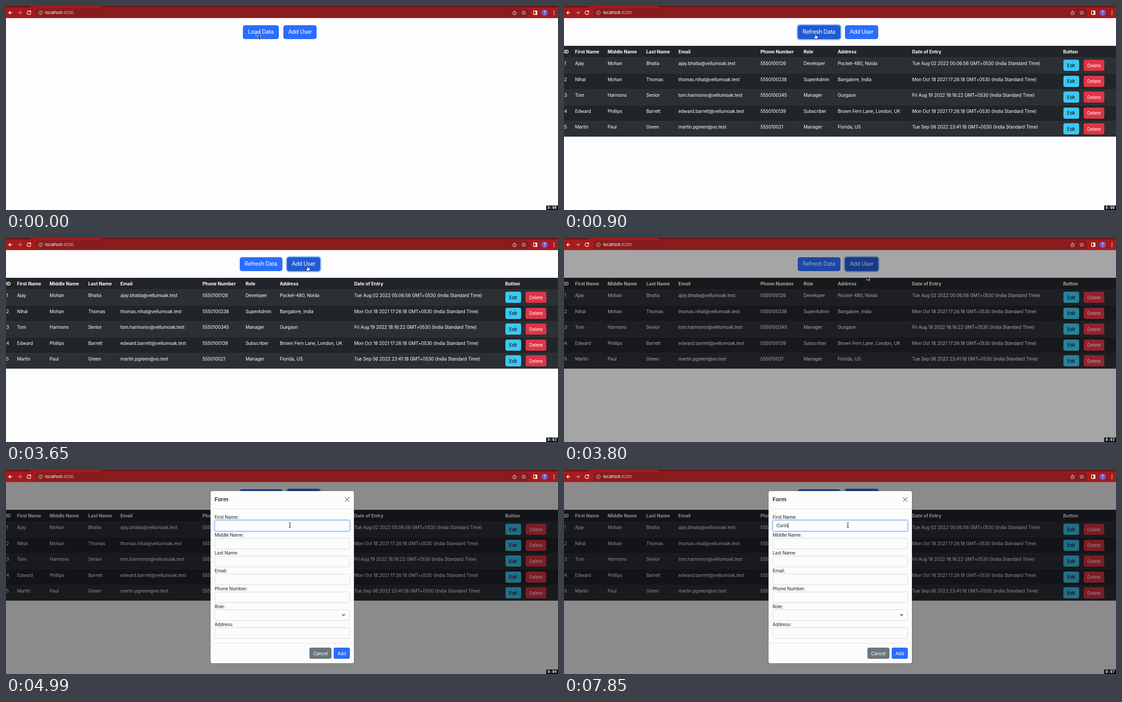
Recreate the animation shown at these times as an HTML page. Size 1228 by 456 pixels, loop 8000 ms.

```html
<!DOCTYPE html>
<html lang="en">
<head>
<meta charset="utf-8">
<title>User table</title>
<style>
html, body { margin: 0; width: 100%; height: 100%; overflow: hidden; }
body { background: #fdfdfd; }
#stage { position: relative; width: 1228px; height: 456px; overflow: hidden; background: #fdfdfd;
  font: 10.2px/20px Inter, "Open Sans", sans-serif; letter-spacing: -.016em; color: #212529; }
#stage div, #stage span, #stage svg { position: absolute; box-sizing: border-box; text-wrap: nowrap; }
#page, #modal, #chrome { left: 0; top: 0; width: 1228px; }
.bar { background: #a51b1c; }
.strip { background: #6f1113; }
.pill { background: #871c1e; border-radius: 10px; }
.url { font-size: 9.3px; color: #fff; }
.url i { font-style: normal; color: #e0b9b9; }
.head { background: #212529; }
.row { background: #212529; border-top: 1px solid #34383b; }
.row.odd { background: #2c3034; }
.cell { color: #fff; }
.th { color: #fff; font-weight: 700; letter-spacing: 0; }
.btn { display: flex; align-items: center; justify-content: center; border-radius: 4px; color: #fff; }
.lg { font-size: 12.6px; letter-spacing: -.03em; border-radius: 5px; background: #2b6dfc; }
.lg.dark { background: #215bd2; }
.lg.ring { box-shadow: 0 0 0 2.5px #9ac0fc; }
.info { background: #3dc8f1; color: #000; }
.danger { background: #dc3547; }
.gray { background: #6c757d; }
.blue { background: #2b6dfc; }
#shade { left: 0; top: 27px; width: 1228px; height: 429px; background: #000; }
.sheet { background: #fcfcfc; border: 1px solid rgba(0,0,0,.2); border-radius: 5px; background-clip: padding-box; }
.rule { background: #dee2e6; }
.title { font-size: 12.4px; font-weight: 600; letter-spacing: 0; }
.input { border: 1px solid #cfd4d9; border-radius: 4px; }
.input.focus { border-color: #86b3fb; box-shadow: 0 0 0 2px #c4d9fc; }
#stage #typed { top: 118.3px !important; height: 12px; border-right: 1px solid transparent; line-height: 12px; }
#stage #typed.on { border-right-color: #111; }
#clock { left: 1202px; top: 446px; width: 26px; height: 10px; background: #000; color: #fff;
  font: bold 8.5px/10px "DejaVu Sans Mono", monospace; letter-spacing: 0; text-align: center; }
</style>
</head>
<body>
<div id="stage">
  <div id="page"></div>
  <div id="shade"></div>
  <div id="modal"></div>
  <div id="chrome"></div>
  <svg width="1228" height="28" style="left:0;top:0" fill="none" stroke="#fff" stroke-width="1.3">
    <path d="M14 15H6.5M10 11.2L6.2 15L10 18.8"/>
    <path d="M26.5 15H34M30.6 11.2L34.4 15L30.6 18.8" stroke="#d68d8d"/>
    <path d="M54.2 12.2A4.2 4.2 0 1 0 55.2 15.6M55 10.4V13.2H52"/>
    <g stroke="#ecd0d0" stroke-width="1">
      <circle cx="76.6" cy="15" r="4.2"/><path d="M76.6 14.4V17.4M76.6 12.4V13.4"/>
      <path d="M1129.6 13.4H1128V19H1134.6V13.4H1133M1131.3 16.5V10.8M1129.4 12.6L1131.3 10.7L1133.2 12.6"/>
      <path d="M1151.8 10.6L1153.1 13.5L1156.2 13.8L1153.9 15.9L1154.6 19L1151.8 17.4L1149 19L1149.7 15.9L1147.4 13.8L1150.5 13.5Z"/>
    </g>
    <path d="M1173.6 11H1181.4V19H1173.6Z"/><path d="M1178 11H1181.4V19H1178Z" fill="#fff" stroke="none"/>
    <circle cx="1198.3" cy="15" r="7.2" fill="#7559c4" stroke="none"/>
    <g fill="#fff" stroke="none"><circle cx="1219" cy="11.2" r="1.1"/><circle cx="1219" cy="15" r="1.1"/><circle cx="1219" cy="18.8" r="1.1"/></g>
  </svg>
  <svg width="1228" height="456" style="left:0;top:0">
    <g id="arrow" stroke="#fff" stroke-width=".8">
      <path d="M0 0V9.6L2.2 7.6L3.6 10.9L5.3 10.2L3.9 7H6.8Z"/>
    </g>
    <g id="hand" fill="#fff" stroke="#000" stroke-width=".8" stroke-linejoin="round">
      <path d="M-1 1Q0 -.5 1 1V4.3L4.6 5.2Q5.5 5.6 5.3 7.3L4.5 11.2H-.8L-3.6 7.5Q-3.9 6 -2.5 6.2L-1 7.5Z"/>
    </g>
    <g id="beam" fill="none" stroke="#222">
      <path d="M-2.5 -5.5Q0 -5.5 0 -4Q0 -5.5 2.5 -5.5M0 -4.5V4.5M-2.5 5.5Q0 5.5 0 4Q0 5.5 2.5 5.5M-1.2 1.5H1.2"/>
    </g>
    <circle id="ripple" cx="561.5" cy="64.5" r="5.5" fill="none" stroke="#a9c6ff" stroke-width=".9"/>
  </svg>
  <div id="clock"></div>
</div>
<script>
const $ = id => document.getElementById(id);
const page = $('page'), modal = $('modal'), chrome = $('chrome');

function add(parent, tag, cls, style, text = '') {
  const e = document.createElement(tag);
  e.className = cls;
  for (const k in style) e.style[k] = style[k] + 'px';
  e.textContent = text;
  return parent.appendChild(e);
}
const box = (p, cls, left, top, width, height, text) => add(p, 'div', cls, { left, top, width, height }, text);
const label = (p, cls, left, mid, text) => add(p, 'span', cls, { left, top: mid - 10 }, text);

// Browser bar
box(chrome, 'bar', 0, 0, 1228, 27);
box(chrome, 'strip', 0, 0, 55, 3);
box(chrome, 'strip', 211, 0, 1017, 3);
box(chrome, 'pill', 65, 5, 1100, 20);
label(chrome, 'url', 87, 15, '').innerHTML = 'localhost<i>:4200</i>';
label($('stage'), 'url', 1195.5, 15, 'T');

// Page
const loadBtn = box(page, 'btn lg', 527, 42.5, 79.5, 31);
const addBtn = box(page, 'btn lg', 617, 42.5, 74, 31, 'Add User');
const table = box(page, '', 0, 0, 1228, 293);
const cols = [0.5, 24.5, 97, 183, 254.5, 437, 533, 609, 774.5, 1110.5];
const heads = ['ID', 'First Name', 'Middle Name', 'Last Name', 'Email', 'Phone Number', 'Role', 'Address', 'Date of Entry', 'Button'];
const zone = ' GMT+0530 (India Standard Time)';
const users = [
  ['Ajay', 'Mohan', 'Bhatia', 'ajay.bhatia@vellumoak.test', '5550100126', 'Developer', 'Pocket-480, Noida', 'Tue Aug 02 2022 05:06:56'],
  ['Nihal', 'Mohan', 'Thomas', 'thomas.nihal@vellumoak.test', '5550100238', 'SuperAdmin', 'Bangalore, India', 'Mon Oct 18 2021 17:26:18'],
  ['Tom', 'Harmons', 'Senior', 'tom.harmonsr@vellumoak.test', '5550100345', 'Manager', 'Gurgaon', 'Fri Aug 19 2022 18:16:22'],
  ['Edward', 'Phillips', 'Barrett', 'edward.barrett@vellumoak.test', '5550100139', 'Subscriber', 'Brown Fern Lane, London, UK', 'Mon Oct 18 2021 17:26:18'],
  ['Martin', 'Paul', 'Green', 'martin.pgreen@vo.test', '555010021', 'Manager', 'Florida, US', 'Tue Sep 06 2022 23:41:18']
];
box(table, 'head', 0, 89, 1228, 26);
heads.forEach((h, i) => label(table, 'th', cols[i], 102, h));
users.forEach((user, r) => {
  const y = 114.8 + r * 35.45;
  box(table, r % 2 ? 'row' : 'row odd', 0, y, 1228, 35.6);
  [r + 1, ...user].forEach((v, c) => label(table, 'cell', cols[c], y + 13.6, c === 8 ? v + zone : v));
  box(table, 'btn info', 1110.5, y + 5.6, 35, 25, 'Edit');
  box(table, 'btn danger', 1156, y + 5.6, 46, 25, 'Delete');
});

// Form
box(modal, 'sheet', 453.5, 45.5, 321.5, 387);
label(modal, 'title', 464, 66, 'Form');
box(modal, 'rule', 454, 86, 320, 1);
box(modal, 'rule', 454, 386.5, 320, 1);
const fields = ['First Name', 'Middle Name', 'Last Name', 'Email', 'Phone Number', 'Role', 'Address'].map((name, i) => {
  label(modal, '', 464, 104.8 + 40 * i, name + ':');
  return box(modal, 'input', 464, 111.8 + 40 * i, 300.5, 25);
});
box(modal, 'btn gray', 675, 397, 49, 25, 'Cancel');
box(modal, 'btn blue', 729, 397, 35.5, 25, 'Add');
modal.insertAdjacentHTML('beforeend',
  `<svg width="775" height="400" style="left:0;top:0" fill="none" stroke-linecap="round" stroke-width="1.3">
    <path d="M754.5 61.5L763.5 70.5M763.5 61.5L754.5 70.5" stroke="#777"/>
    <path d="M748 322.5L751 325.5L754 322.5" stroke="#343a40"/></svg>`);
const typed = label(modal, '', 472.5, 128, '');
typed.id = 'typed';

// Each pose holds until the next entry
const path = [
  [0, 'arrow', 561, 65], [150, 'hand', 560, 62], [300, 'hand', 559.5, 62],
  [1220, 'hand', 566, 66], [1370, 'arrow', 615, 84], [1520, 'arrow', 755, 112],
  [1670, 'arrow', 925, 132], [1820, 'arrow', 1055, 139], [1970, 'hand', 1114, 137],
  [2130, 'hand', 1121, 135], [2280, 'hand', 1140, 135], [2430, 'hand', 1168, 135],
  [2580, 'hand', 1174, 134], [2730, 'arrow', 1149, 134], [2880, 'hand', 1119.5, 133.5],
  [3030, 'arrow', 965, 108], [3200, 'arrow', 699, 57], [3350, 'hand', 672, 58],
  [3650, 'hand', 671, 62], [3800, 'arrow', 674, 85], [3940, 'beam', 634, 121.5],
  [4090, 'beam', 632, 123], [4240, 'beam', 631.5, 123.5]
];
const typing = [[0, ''], [5600, 'C'], [5900, 'Co'], [6050, 'Cor'], [6200, 'Corn'], [6950, 'Cor'], [7700, 'Cori'], [7850, 'Corin']];
const caret = [[0, false], [4540, true], [4990, false], [5450, true], [6650, false], [6950, true]];
const shade = [[0, 0], [3800, .35], [3940, .45]];
const sheet = [[0, 0, -32], [3940, .91, -12], [4090, 1, -2], [4240, 1, 0]];
const ticks = [920, 1990, 3050, 3940, 5010, 6050, 7100];
const at = (list, t) => list.findLast(e => e[0] <= t);

function render(t) {
  const loaded = t >= 900;
  loadBtn.textContent = loaded ? 'Refresh Data' : 'Load Data';
  loadBtn.style.left = (loaded ? 519.5 : 527) + 'px';
  loadBtn.style.width = (loaded ? 95 : 79.5) + 'px';
  addBtn.style.left = (loaded ? 625 : 617) + 'px';
  loadBtn.classList.toggle('dark', t >= 150 && t < 3500);
  loadBtn.classList.toggle('ring', t >= 750 && t < 3500);
  addBtn.classList.toggle('dark', t >= 3350);
  addBtn.classList.toggle('ring', t >= 3500);
  table.style.visibility = loaded ? 'visible' : 'hidden';

  $('shade').style.opacity = at(shade, t)[1];
  const [, alpha, dy] = at(sheet, t);
  modal.style.opacity = alpha;
  modal.style.transform = `translateY(${dy}px)`;
  fields[0].classList.toggle('focus', t >= 4540);
  typed.textContent = at(typing, t)[1];
  typed.classList.toggle('on', at(caret, t)[1]);

  const [, kind, x, y] = at(path, t);
  for (const id of ['arrow', 'hand', 'beam']) {
    $(id).style.display = id === kind ? '' : 'none';
    $(id).setAttribute('transform', `translate(${x} ${y})`);
  }
  $('ripple').style.display = t < 150 ? '' : 'none';
  $('clock').textContent = '0:0' + ticks.filter(s => s <= t).length;
}

const start = performance.now();
function loop() {
  render((performance.now() - start) % 8000);
  requestAnimationFrame(loop);
}
loop();
</script>
</body>
</html>
```
